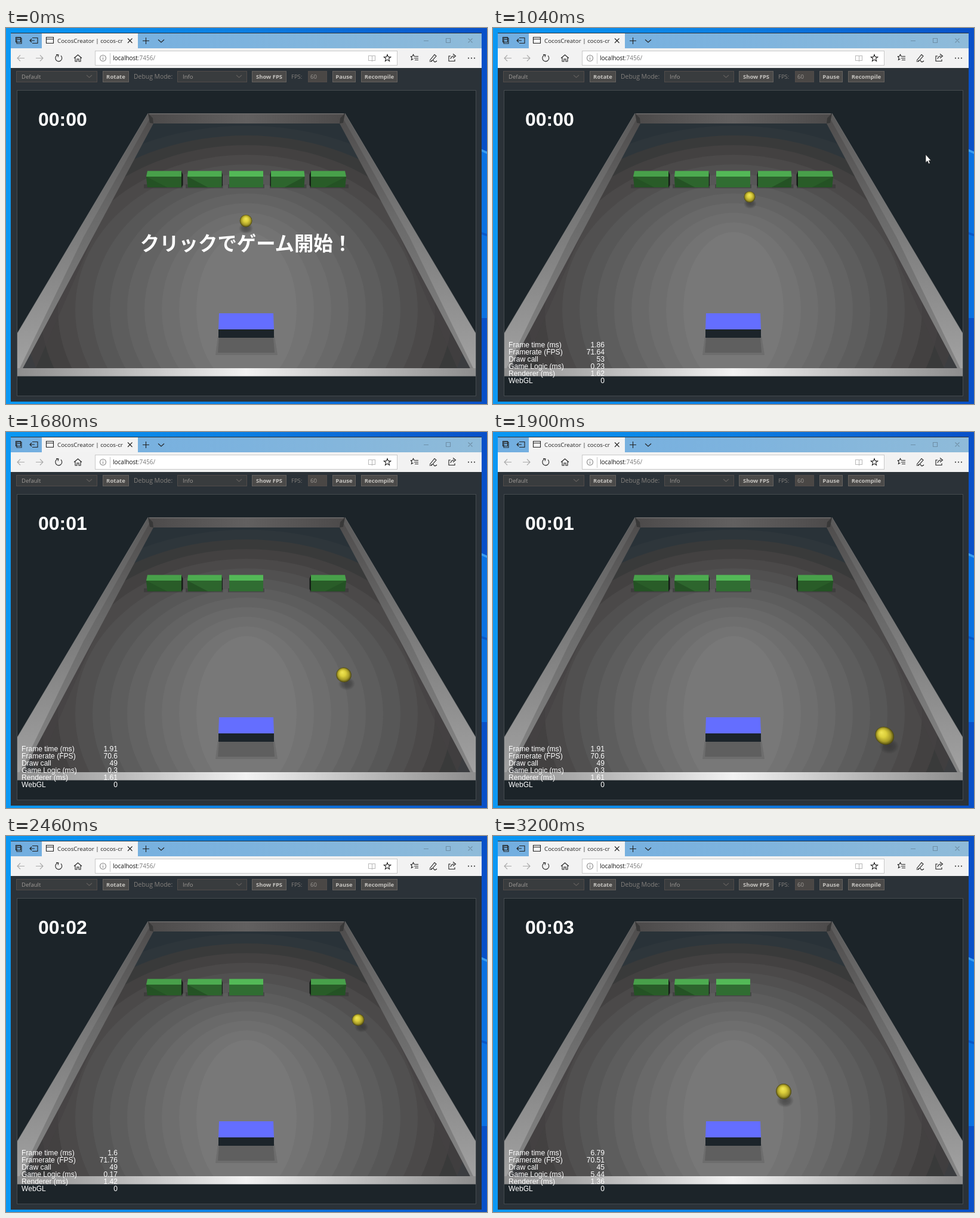
Recreate the animation shown at these times as an HTML page. Size 806 by 630 pixels, loop 3300 ms.

```html
<!DOCTYPE html>
<html lang="ja">
<head>
<meta charset="utf-8">
<title>Block game</title>
<style>
html, body { margin: 0; width: 100%; height: 100%; overflow: hidden; background: #1c2429; }
svg { display: block; width: 806px; height: 630px; }
text { white-space: pre; }
.ui { font-family: "Open Sans", "Noto Sans", sans-serif; font-size: 10px; }
.bar { font-size: 9.5px; fill: #a09c98; }
.btn { font-weight: 700; fill: #c6c4c0; }
.stat { font-family: "Liberation Sans", Arial, sans-serif; font-size: 12.1px; fill: #fff; }
.end { text-anchor: end; }
.clock { font: 700 32px "Liberation Sans", Arial, sans-serif; fill: #fff; }
.call { font: 700 32.4px "Noto Sans CJK JP", "Noto Sans CJK", sans-serif; fill: #fff; text-anchor: middle; }
.icon { fill: none; stroke: #222; stroke-width: 1.1; }
</style>
</head>
<body>
<svg id="stage" viewBox="0 0 806 630" xmlns="http://www.w3.org/2000/svg"></svg>
<script>
const LOOP = 3300, STEP = 20;
const stage = document.getElementById('stage');

const rect = (x, y, w, h, fill, extra = '') =>
  `<rect x="${x}" y="${y}" width="${w}" height="${h}" fill="${fill}" ${extra}/>`;
const poly = (points, fill, extra = '') => `<polygon points="${points}" fill="${fill}" ${extra}/>`;
const label = (x, y, cls, str, extra = '') => `<text x="${x}" y="${y}" class="${cls}" ${extra}>${str}</text>`;
const icon = (d, extra = '') => `<path class="icon" d="${d}" ${extra}/>`;
const stops = list => list.map(([o, c, a = 1]) =>
  `<stop offset="${o}" stop-color="${c}" stop-opacity="${a}"/>`).join('');
const linear = (id, x2, y2, list) =>
  `<linearGradient id="${id}" x2="${x2}" y2="${y2}">${stops(list)}</linearGradient>`;

const defs = `<defs>
  ${linear('sky', 1, 0, [[0, '#0a98f4'], [.5, '#0c7ee2'], [1, '#0850c8']])}
  ${linear('title', 1, 0, [[0, '#72aee0'], [.5, '#7db3de'], [1, '#8fbbd9']])}
  ${linear('side', 0, 1, [[0, '#5a5959'], [.35, '#747474'], [.8, '#959595'], [1, '#a4a4a4']])}
  ${linear('face', 0, 1, [[0, '#4e4c4c'], [.4, '#6a6a6a'], [1, '#858585']])}
  ${linear('front', 1, 0, [[0, '#8d8d8d'], [.2, '#b4b4b4'], [.5, '#f2f2f2'], [.8, '#b4b4b4'], [1, '#8d8d8d']])}
  ${linear('back', 1, 0, [[0, '#4c4a4a'], [.5, '#626060'], [1, '#4c4a4a']])}
  <radialGradient id="ball" fx=".5" fy=".32">${stops([[0, '#f0e656'], [.4, '#dccf3c'], [.75, '#a89c28'], [.92, '#6b6418'], [1, '#45400e']])}</radialGradient>
  <radialGradient id="shade">${stops([[0, '#262626', .5], [.55, '#262626', .36], [1, '#262626', 0]])}</radialGradient>
  <clipPath id="view">${rect(19, 105, 768, 511, '#000')}</clipPath>
  <clipPath id="ground"><polygon points="245,160 562,160 778,570 28,570"/></clipPath>
  <clipPath id="tab">${rect(60, 9, 136, 25, '#000')}</clipPath>
</defs>`;

function desktop() {
  return rect(0, 0, 806, 630, 'url(#sky)') +
    poly('797,203 806,208 806,486 797,486', '#0a72e2') +
    poly('797,203 806,207 806,211 797,207', '#3a9cf0') +
    poly('797,342 806,345 806,349 797,346', '#0858c8') +
    rect(8, 8, 789, 618, '#2b3238');
}

function browser() {
  const star = Array.from({ length: 10 }, (_, i) => {
    const r = i % 2 ? 2.6 : 6, a = i * Math.PI / 5 - Math.PI / 2;
    return `${(639 + r * Math.cos(a)).toFixed(1)},${(50.5 + r * Math.sin(a)).toFixed(1)}`;
  });
  return rect(8, 9, 789, 26, 'url(#title)') + rect(60, 9, 161, 26, '#f3f3f3') +
    icon('M16.5 15.5h8v8h-8z M18 17h8v9h-8z M19 19.5h6') +
    icon('M44 16.5h9v9h-9 M40 21h8 M43 18l-3 3 3 3') +
    icon('M67.5 15.5h12v10h-12z M67.5 18.5h12') +
    label(86, 25, 'ui', 'CocosCreator | cocos-cr', 'fill="#222" style="font-size:9.8px" clip-path="url(#tab)"') +
    icon('M204 17.5l7.5 7.5 M211.5 17.5l-7.5 7.5') +
    icon('M229 21.5h11 M234.5 16v11 M255 19.5l5 4.5 5-4.5') +
    icon('M700 21.5h8 M737.5 17.5h7v7h-7z M774.5 17.5l7 7 M781.5 17.5l-7 7', 'stroke-opacity=".28"') +
    rect(8, 34, 789, 33, '#f2f2f2') + rect(149.5, 38.5, 506, 24, '#fff', 'stroke="#c9c9c9"') +
    icon('M31 50.5h-12 M24 45.5l-5 5 5 5 M50 50.5h12 M57 45.5l5 5-5 5', 'style="stroke:#aaa"') +
    icon('M92 46.3a5.5 5.5 0 1 1-5-1.3 M84 44.5l4 .4-1 3.8') +
    icon('M114 50.5l6.5-5.5 6.5 5.5 M116 49.5v6.5h3v-4h3v4h3v-6.5') +
    icon('M157.5 50.5a5 5 0 1 1 10 0a5 5 0 1 1-10 0 M162.5 49.5v4 M162.5 47v1.3', 'style="stroke:#888"') +
    icon('M174.5 42v18', 'style="stroke:#ccc"') +
    label(179, 54, 'ui', 'localhost<tspan fill="#777">:7456/</tspan>', 'fill="#111"') +
    icon('M607.5 46.5h5l1 1 1-1h4v8h-4l-1 1-1-1h-5z M613.5 47.5v8', 'style="stroke:#bbb"') +
    poly(star.join(' '), 'none', 'stroke="#222" stroke-width="1.1"') +
    icon('M678 47.5l3-.3 1.5-2.7 1.5 2.7 2 .3 M678 47.5l2 2-.6 4 3-1.8 M686 47.5h5 M684 50.5h7 M685 53.5h6') +
    icon('M710 54.5l8-10 3 2.5-8 9-3.5 0 M712 55.5q4-3 5 0t5-.5') +
    icon('M745 47h-3v8.5h10v-3 M745 52q1-5 6-5 M749 43.5l4.5 3.5-4.5 3.5') +
    [775, 780, 785].map(x => `<circle cx="${x}" cy="50.5" r="1" fill="#222"/>`).join('');
}

function toolbar() {
  const box = (x, w, fill, line) => rect(x + .5, 72.5, w, 18, fill, `stroke="${line}"`);
  const select = (x, w, str) => box(x, w, '#393c3e', '#514c4a') + label(x + 9, 84.5, 'ui bar', str) +
    icon(`M${x + w - 17} 79l4.5 4 4.5-4`, 'style="stroke:#625f5d"');
  const button = (x, w, str) => box(x, w, '#4b4a49', '#65615e') +
    label(x + w / 2 + .5, 84.5, 'ui bar btn', str, 'text-anchor="middle"');
  return select(17, 135, 'Default') + button(162, 43, 'Rotate') +
    label(214, 85, 'ui bar', 'Debug Mode:', 'style="font-size:10.4px;fill:#85817d"') +
    select(287, 116, 'Info') + button(412, 57, 'Show FPS') +
    label(478, 84.5, 'ui bar', 'FPS:', 'style="fill:#85817d"') +
    box(506, 31, '#4a4745', '#514c4a') + label(510, 84.5, 'ui bar', '60') +
    button(547, 38, 'Pause') + button(595, 60, 'Recompile');
}

function floor() {
  // Light falls off in flat elliptical bands.
  const tones = ['#2e363b', '#393a3a', '#434141', '#4b4949', '#515050', '#575757',
    '#5d5d5d', '#636363', '#696969', '#6e6e6e', '#737373', '#787878'];
  const bands = tones.map((c, i) => {
    const k = tones.length - 1 - i;
    return `<ellipse cx="403" cy="472" rx="${84 + k * 29}" ry="${130 + k * 16.2}" fill="${c}"/>`;
  });
  return `<g clip-path="url(#ground)">${rect(18, 140, 770, 440, '#293238')}${bands.join('')}
    ${poly('150,341 28,570 50,570', '#454243', 'opacity=".6"')}
    ${poly('656,341 778,570 756,570', '#454243', 'opacity=".6"')}</g>`;
}

function walls() {
  const left = poly('238,143 245,160 28,570 18,583 18,513', 'url(#side)') +
    poly('243,148 247,160 28,570 23,570 130,350', 'url(#face)') +
    poly('238,143 246,151 247,160 241,159', '#383838') +
    '<path d="M238 143L18 513" stroke="#8c8c8c" stroke-opacity=".5"/>';
  return poly('238,143 567,143 562,160 245,160', 'url(#back)') +
    rect(240, 143, 326, 1.5, '#6e6c6c') + left +
    `<g transform="matrix(-1 0 0 1 806 0)">${left}</g>` +
    poly('28,570 778,570 787,570 787,583.5 18,583.5 18,570', 'url(#front)');
}

function brick(i) {
  const x = [235, 304, 374, 444, 511][i], w = [59, 57.5, 57, 56.5, 59][i];
  const lean = 2 - i, l = Math.max(lean, 0), r = Math.max(-lean, 0);
  const top = ['#48a04a', '#4dac50', '#53b957', '#4dac50', '#48a04a'][i];
  const front = ['#295c28', '#2d652d', '#306d32', '#2d652d', '#295c28'][i];
  const near = lean > 0 ? x + w : x, far = near + (lean > 0 ? .5 + l : -.5 - r);
  return `<g id="brick${i}">` +
    poly(`${x - 2 - l},262 ${x + w + 2 + r},262 ${x + w + 2 + r},268.5 ${x - 2 - l},268.5`, '#333', 'opacity=".55"') +
    (lean ? poly(`${near},240 ${far},246 ${far},263 ${near},267`, '#141c16') : '') +
    poly(`${x},249 ${x + w},249 ${x + w - r},267 ${x + l},267`, front) +
    (lean ? poly(lean > 0 ? `${x},249 ${x + w * .6},267 ${x + l},267` : `${x + w},249 ${x + w * .4},267 ${x + w - r},267`, '#245224') : '') +
    poly(`${x + l},239.5 ${x + w - r},239.5 ${x + w},249 ${x},249`, top) + '</g>';
}

const paddle = poly('355,516 450,516 455,548 351,548', '#5a5a5a', 'opacity=".35"') +
  poly('357,519 448,519 450,544 355,544', '#585858', 'opacity=".65"') +
  rect(356, 505, 93, 14, '#1c242a') + poly('357,478 448,478 449,505 356,505', '#646eff');

const statNames = ['Frame time (ms)', 'Framerate (FPS)', 'Draw call', 'Game Logic (ms)', 'Renderer (ms)', 'WebGL'];
const statRows = statNames.map((name, i) => label(26, 535 + 12 * i, 'stat', name) +
  label(187, 535 + 12 * i, 'stat end', '0', `id="stat${i}"`)).join('');

stage.innerHTML = defs + desktop() + browser() + toolbar() +
  rect(18.5, 104.5, 769, 512, '#1c2429', 'stroke="#454b4f"') +
  `<g clip-path="url(#view)">${floor()}${walls()}${[0, 1, 2, 3, 4].map(brick).join('')}${paddle}
    <ellipse id="shadow" fill="url(#shade)"/><ellipse id="sphere" fill="url(#ball)"/></g>` +
  label(54, 164, 'clock', '00:00', 'id="clock"') +
  label(402.5, 372.5, 'call', 'クリックでゲーム開始！', 'id="call"') +
  `<g id="stats">${statRows}</g>` +
  `<path id="cursor" d="M0 0V13.5L3 10.7L5 15.5L7.3 14.5L5.3 10H9Z" fill="#fff" stroke="#222" stroke-width=".7"/>`;

const el = id => document.getElementById(id);
const show = (id, on) => { el(id).style.display = on ? '' : 'none'; };
const put = (id, attrs) => { for (const k in attrs) el(id).setAttribute(k, attrs[k]); };

// Time, sideways position and inverse depth on the table plane.
const path = [
  [860, -.002, .002166], [1040, .064, .002372], [1110, .09, .00245], [1680, .2988, .001833],
  [1962, .417, .001463], [2100, .4749, .001643], [2209, .517, .001823], [2460, .4187, .002239],
  [2602, .34, .00245], [2820, .2444, .002125], [2900, .2126, .002006], [2980, .2126, .002006],
  [3200, .1483, .001765]
];
const pointer = [[500, 798, 262], [580, 760, 232], [660, 725, 212], [1350, 725, 212], [1420, 752, 222]];
const statLog = [
  [40, '1.78', '72.4', 53, '0.2', '1.55'], [220, '1.69', '72.8', 53, '0.18', '1.49'],
  [500, '1.74', '71.06', 53, '0.19', '1.52'], [860, '1.86', '71.64', 53, '0.23', '1.62'],
  [1380, '1.91', '70.6', 49, '0.3', '1.61'], [1980, '1.99', '72.91', 49, '0.17', '1.82'],
  [2320, '1.6', '71.76', 49, '0.17', '1.42'], [2640, '1.54', '72.31', 45, '0.16', '1.38'],
  [3020, '6.79', '70.51', 45, '5.44', '1.36']
];

function along(keys, t) {
  const n = keys.findIndex(k => k[0] > t);
  if (n === 0) return keys[0].slice(1);
  if (n < 0) return keys[keys.length - 1].slice(1);
  const a = keys[n - 1], b = keys[n], p = (t - a[0]) / (b[0] - a[0]);
  return a.slice(1).map((v, i) => v + (b[i + 1] - v) * p);
}

function draw(t) {
  const [side, depth] = along(path, t), scale = 1 / depth;
  const x = 403 + side * scale, y = scale - 138.6, r = .0226 * scale;
  // The lens stretches the ball away from the middle; the light stays above the table centre.
  const dx = x - 403, dy = y - 330, d = Math.hypot(dx, dy), k = (d / 900) ** 2;
  const c = dx / d, s = dy / d;
  put('sphere', { rx: r, ry: r, transform:
    `matrix(${1 + k * c * c} ${k * c * s} ${k * c * s} ${1 + k * s * s} ${x} ${y})` });
  put('ball', { fx: .5 - dx / 1500 });
  put('shadow', { cx: x + dx * .03, cy: y + r * 1.2, rx: r * 1.15, ry: r * .9 });

  show('call', t < 820);
  show('brick3', t < 1110);
  show('brick4', t < 2602);
  el('clock').textContent = '00:0' + [1380, 2000, 2640].filter(v => t >= v).length;

  const [px, py] = along(pointer, t);
  show('cursor', t >= 500 && t < 1440);
  put('cursor', { transform: `translate(${px} ${py})` });

  const row = statLog.filter(v => v[0] <= t).pop();
  show('stats', row);
  if (row) row.slice(1).forEach((v, i) => { el('stat' + i).textContent = v; });
}

const start = performance.now();
function tick() {
  const t = (performance.now() - start) % LOOP;
  draw(Math.floor(t / STEP) * STEP);
  requestAnimationFrame(tick);
}
tick();
</script>
</body>
</html>
```
